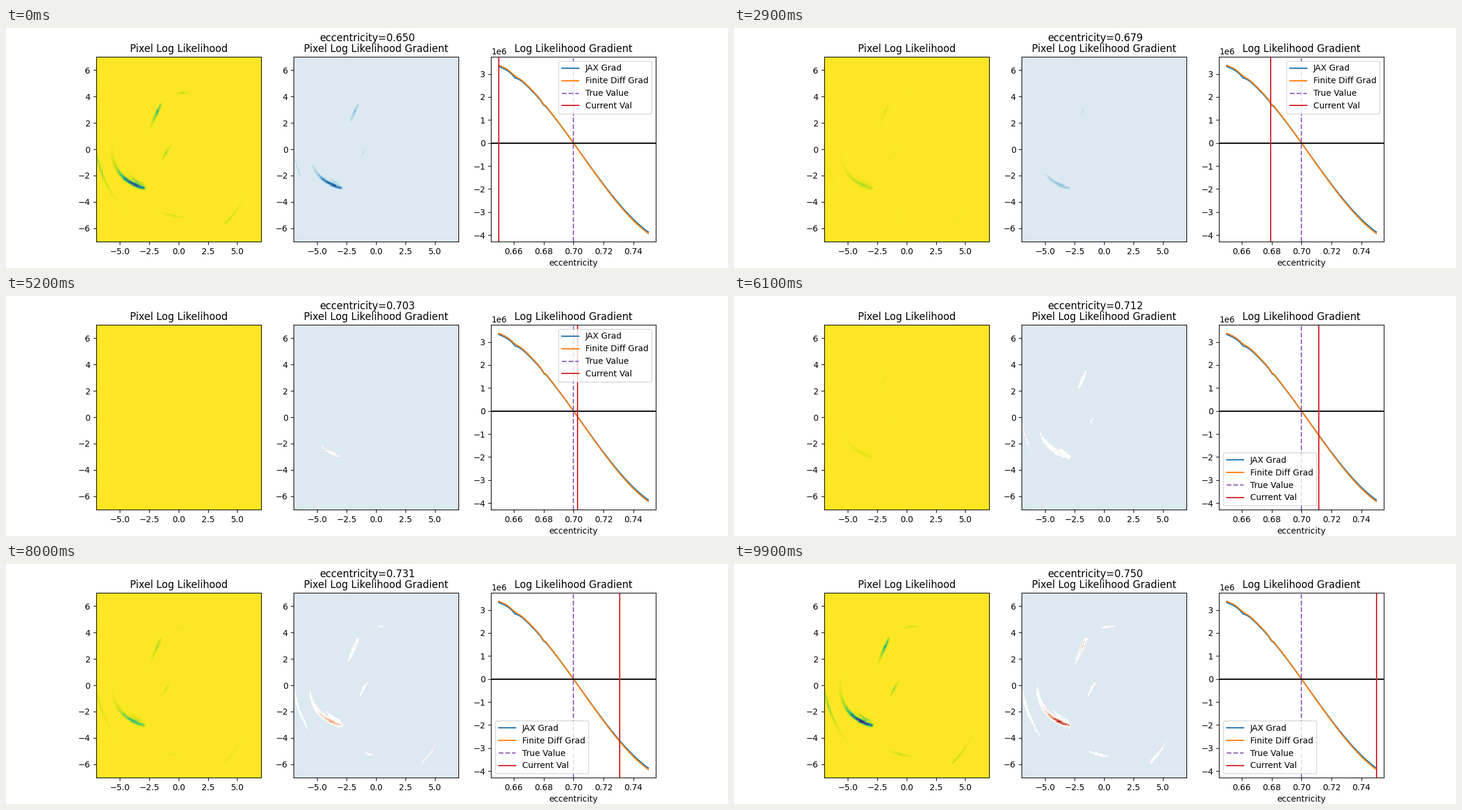
Write a matplotlib script that moves like this. It is 1200 by 400 pixels and loops after 10 s.

```python
import numpy as np
import matplotlib.pyplot as plt
from matplotlib.animation import FuncAnimation
from matplotlib.colors import ListedColormap

FRAMES, SIZE, LIM = 100, 140, 7.005
E_TRUE, E_SPAN = 0.70, 0.05
ZERO = 0.571  # place of zero gradient on the diverging colour scale

cells = LIM * (2 * np.arange(SIZE) + 1 - SIZE) / SIZE
grain = np.random.default_rng(4).uniform(0.75, 1.15, (SIZE, SIZE))

# start, end, bow (share of the chord), strength, brightest point along the arc
ARCS = [
    (-5.57 + 0.90j, -2.98 - 2.98j, -0.23, 1.00, 0.86),
    (-4.60 - 1.40j, -3.05 - 2.66j, -0.12, 0.26, 0.75),
    (-1.55 + 3.45j, -2.60 + 1.30j, 0.00, 0.46, 0.28),
    (-0.60 + 0.40j, -1.45 - 0.85j, 0.00, 0.23, 0.55),
    (-0.35 + 4.20j, 1.35 + 4.30j, 0.07, 0.10, 0.40),
    (-6.98 - 0.40j, -3.70 - 5.35j, -0.10, 0.20, 0.18),
    (-1.90 - 4.75j, 0.60 - 5.30j, -0.03, 0.10, 0.55),
    (3.95 - 5.75j, 6.20 - 2.20j, -0.07, 0.11, 0.12),
]


def ridge(start, end, bow, strength, peak, stretch):
    """Soft curved stroke, fading to both sides of its brightest point."""
    t = np.linspace(0, 1, 160)
    path = start + (end - start) * (t + 4j * bow * t * (1 - t))
    amp = strength * np.exp(-(abs(t - peak) / 0.28)**1.4)
    width = 0.05 + 0.035 * strength
    out = np.zeros((SIZE, SIZE))
    for x, y, a in zip(path.real, path.imag * stretch, amp):
        across = np.exp(-((cells - x) / width)**2 / 2)
        upward = np.exp(-((cells - y) / width)**2 / 2)
        out = np.maximum(out, a * np.outer(upward, across))
    return out


def field(stretch):
    total = sum(ridge(*arc, stretch) for arc in ARCS)
    return np.minimum(total * grain, 1)


low_field, high_field = field(0.98), field(1.02)


def diverging():
    """Red to blue, with flat bands around zero."""
    pos = np.linspace(0, 1, 1024)
    cols = plt.get_cmap("RdBu")(pos)
    cols[(pos > 0.49) & (pos <= 0.557), :3] = 1
    cols[(pos > 0.557) & (pos <= 0.564), :3] = np.array([232, 232, 238]) / 255
    cols[(pos > 0.564) & (pos < 0.616), :3] = np.array([220, 233, 241]) / 255
    return ListedColormap(cols)


def maps(e):
    d = (e - E_TRUE) / E_SPAN
    f = low_field + (high_field - low_field) * (d + 1) / 2
    like = -f * d**2 * (0.88 if d < 0 else 1)
    grad = ZERO - f * d * (0.4 if d < 0 else 0.5)
    return like, grad


def dip(e, centre, depth, width):
    return depth * np.exp(-((e - centre) / width)**2)


def slope(e):
    u = (e - E_TRUE) / E_SPAN
    cubic = -4.585 * u - 0.275 * u**2 + 0.93 * u**3
    return cubic - dip(e, 0.661, 0.06, 0.003) - dip(e, 0.680, 0.06, 0.001)


def picture(ax, title, cmap, vmin, vmax):
    ax.set_title(title)
    return ax.imshow(np.zeros((SIZE, SIZE)), cmap=cmap, vmin=vmin, vmax=vmax,
                     origin="lower", extent=(-LIM, LIM, -LIM, LIM),
                     aspect="auto", interpolation="nearest")


fig, (ax1, ax2, ax3) = plt.subplots(1, 3, figsize=(12, 4), dpi=100)
heading = fig.suptitle("eccentricity=0.650")
like_im = picture(ax1, "Pixel Log Likelihood", "viridis", -1, 0)
grad_im = picture(ax2, "Pixel Log Likelihood Gradient", diverging(), 0, 1)

es = np.linspace(E_TRUE - E_SPAN, E_TRUE + E_SPAN, FRAMES)
finite = slope(es)
jax = 0.984 * finite - dip(es, 0.661, 0.04, 0.0009)

ax3.set_title("Log Likelihood Gradient")
ax3.set_xlabel("eccentricity")
ax3.plot(es, jax * 1e6, label="JAX Grad")
ax3.plot(es, finite * 1e6, label="Finite Diff Grad")
ax3.axhline(0, color="black")
ax3.axvline(E_TRUE, color="tab:purple", ls="--", label="True Value")
marker = ax3.axvline(es[0], color="tab:red", label="Current Val")
ax3.set_xlim(0.645, 0.755)
ax3.set_ylim(-4.285e6, 3.747e6)
legend = ax3.legend(loc="upper right")


def update(i):
    e = es[i]
    like, grad = maps(e)
    like_im.set_data(like)
    grad_im.set_data(grad)
    marker.set_xdata([e, e])
    heading.set_text(f"eccentricity={e:.3f}")
    # the legend moves once the marker has left the lower left corner
    legend.set_loc("lower left" if e > 0.7101 else "upper right")
    return like_im, grad_im, marker, heading, legend


anim = FuncAnimation(fig, update, frames=FRAMES, interval=100,
                     init_func=lambda: update(0), repeat=True, repeat_delay=0,
                     blit=False)
plt.show()
```
